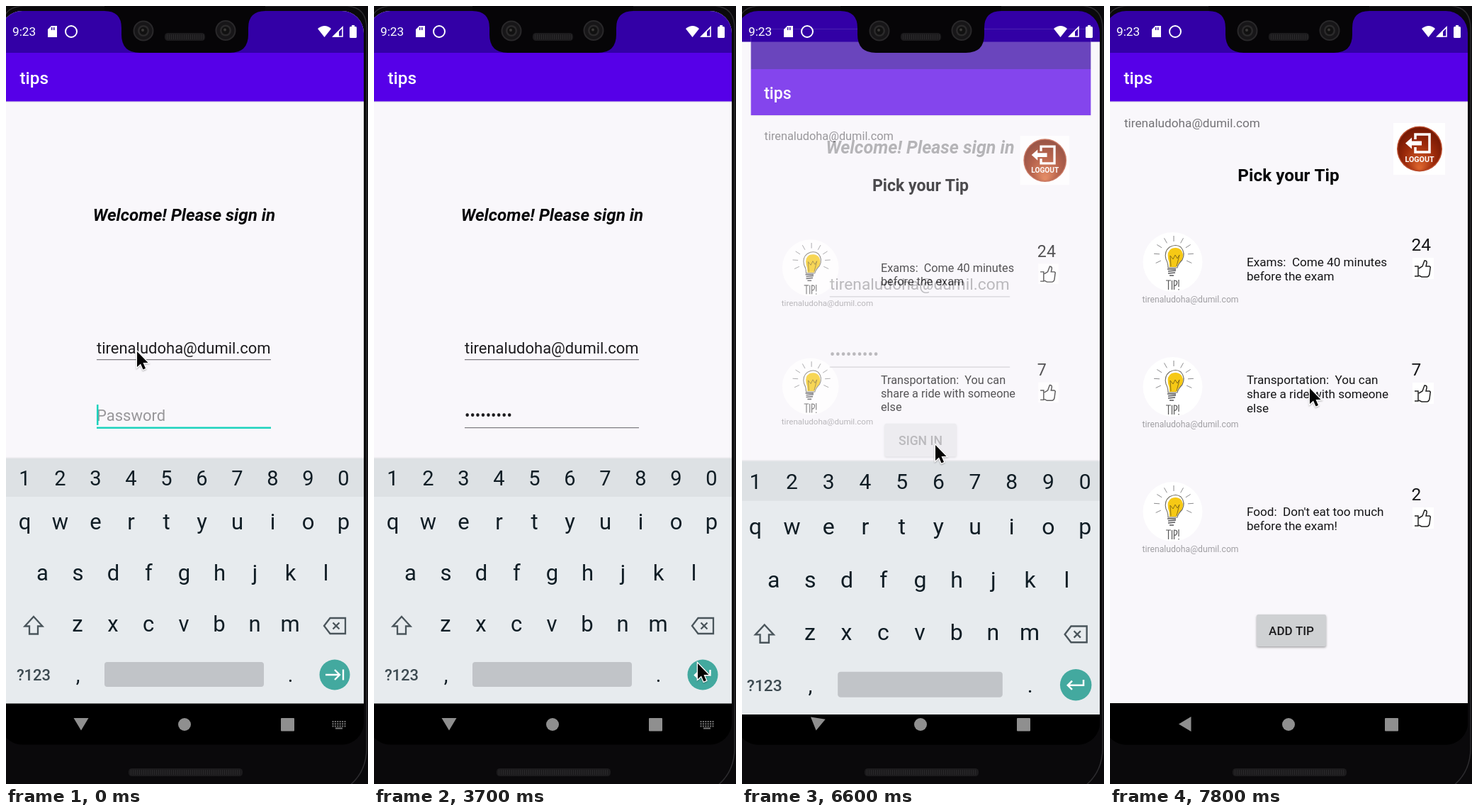
Animation, 511 px wide and 1097 px high, one loop 8000 ms. Source, as an HTML page with a canvas:

```html
<!DOCTYPE html>
<html lang="en">
<head>
<meta charset="utf-8">
<title>Sign in</title>
<style>
html, body { margin: 0; width: 100%; height: 100%; overflow: hidden; background: #0a090b; }
canvas { display: block; }
</style>
</head>
<body>
<canvas id="stage" width="511" height="1097"></canvas>
<script>
const LOOP = 8000, STEP = 100, W = 511, H = 1097;
const FONT = 'Roboto, "Open Sans", sans-serif';
const EMAIL = 'tirenaludoha@dumil.com';
const BAR = '#3300a6', PURPLE = '#5600e8', PAPER = '#f9f7fb', TEAL = '#1cd3bd';
const PIVOT = { x: 252, y: 524 };
const FOCUS_LOST = 3700, OPENING = 6500;

const stage = document.getElementById('stage').getContext('2d');
const scratch = Object.assign(document.createElement('canvas'), { width: W, height: H });
let g = stage;

// Interpolates rows of [time, ...values]; smooth rows ease in and out.
function track(t, rows, smooth) {
  if (t <= rows[0][0]) return rows[0].slice(1);
  for (let i = 1; i < rows.length; i++) {
    const a = rows[i - 1], b = rows[i];
    if (t > b[0]) continue;
    let p = (t - a[0]) / (b[0] - a[0]);
    if (smooth) p = p * p * (3 - 2 * p);
    return a.slice(1).map((v, k) => v + (b[k + 1] - v) * p);
  }
  return rows[rows.length - 1].slice(1);
}

function rect(x, y, w, h, color, r = 0) {
  g.fillStyle = color;
  g.beginPath();
  g.roundRect(x, y, w, h, r);
  g.fill();
}

function disc(x, y, r, color) {
  g.fillStyle = color;
  g.beginPath();
  g.arc(x, y, r, 0, Math.PI * 2);
  g.fill();
}

function text(str, x, y, size, color, align = 'left', style = '') {
  g.font = `${style} ${size}px ${FONT}`;
  g.fillStyle = color;
  g.textAlign = align;
  g.fillText(str, x, y);
}

function line(d, color, width) {
  g.strokeStyle = color;
  g.lineWidth = width;
  g.stroke(new Path2D(d));
}

function shape(d, color) {
  g.fillStyle = color;
  g.fill(new Path2D(d));
}

// Draws a window as one flat layer, scaled about the screen centre.
function layer(alpha, scale, dy, draw) {
  if (alpha <= 0) return;
  g = scratch.getContext('2d');
  g.clearRect(0, 0, W, H);
  g.save();
  g.translate(PIVOT.x, PIVOT.y + dy);
  g.scale(scale, scale);
  g.translate(-PIVOT.x, -PIVOT.y);
  draw();
  g.restore();
  g = stage;
  g.save();
  g.globalAlpha = alpha;
  g.drawImage(scratch, 0, 0);
  g.restore();
}

function toolbar() {
  rect(0, 134, 505, 2, '#e6e3ea');
  rect(0, 66, 505, 68.5, PURPLE);
  text('tips', 19.5, 110, 24.3, '#fff', 'left', '500');
}

function button(label, x, y, color) {
  g.save();
  g.shadowColor = 'rgba(0,0,0,.35)';
  g.shadowBlur = 3;
  g.shadowOffsetY = 1.5;
  rect(x, y, 98, 45, color, 2.5);
  g.restore();
  text(label, x + 49, y + 29, 17, '#1b1b1d', 'center', '500');
}

function passwordField(t) {
  const typed = Math.min(9, Math.max(0, Math.floor((t - 200) / 300) + 1));
  const focused = t < FOCUS_LOST;
  const value = !typed ? '' : focused ? '•'.repeat(typed - 1) + typed : '•'.repeat(typed);
  if (typed) text(value, 128, 585, 22, '#1d1c1f');
  else text('Password', 128, 585, 22, '#98979a');
  if (!focused) return rect(128, 594, 246, 1.2, '#7f7e82');
  rect(128, 593.5, 246, 2.5, TEAL);
  const lastKey = typed ? 200 + (typed - 1) * 300 : 0;
  const end = typed ? g.measureText(value).width : 0;
  if ((t - lastKey) % 1000 < 500) rect(128 + end, 562, 2.5, 29, TEAL);
}

function signIn(t) {
  const [pan] = track(t, [[3700, 0], [3800, 20], [3900, 58], [4000, 78], [4100, 84], [4200, 85]]);
  const dark = (t >= FOCUS_LOST && t < 4300) || (t >= 6100 && t < 6300);
  rect(0, 7, 505, 976, PAPER);
  g.save();
  g.translate(0, -pan);
  toolbar();
  text('Welcome! Please sign in', 251.5, 303, 24.2, '#08080a', 'center', 'italic bold');
  text(EMAIL, 128, 489.5, 22, '#1d1c1f');
  rect(128, 498, 246, 1.2, '#7f7e82');
  passwordField(t);
  button('SIGN IN', 203, 671.5, dark ? '#bfbdc0' : '#cfd1d2');
  g.restore();
  rect(0, 0, 505, 66, BAR);
}

function logout() {
  rect(400, 165, 73, 73, '#fff');
  const glow = g.createRadialGradient(437, 228, 2, 437, 206, 34);
  glow.addColorStop(0, '#d9622c');
  glow.addColorStop(.6, '#9c2a0a');
  glow.addColorStop(1, '#741803');
  disc(437, 201.5, 32, '#b8492a');
  disc(437, 201.5, 30.5, glow);
  line('M431 188v-7h20v25h-20v-7', '#fff', 3.5);
  shape('M417 193.5l9-8v5h14v6h-14v5z', '#fff');
  text('LOGOUT', 437, 220, 10.7, '#fff', 'center', 'bold');
}

function bulb() {
  disc(88.5, 361, 42, '#fff');
  for (let i = 0; i < 9; i++) {
    const a = Math.PI * (.86 + i * .16), c = Math.cos(a), s = Math.sin(a);
    line(`M${90 + c * 20} ${351 + s * 19}L${90 + c * 28} ${351 + s * 27}`, '#8c8c8e', 1);
  }
  shape('M84 368q0-7-2-12q-2-10 5-14q9-3 14 3q4 7 0 14q-6 5-7 9z', '#f6c915');
  line('M82 369q0-7-3-12q-3-11 5-17q9-5 16 0q7 8 2 18q-6 6-7 11z', '#6d6a60', 1.1);
  line('M86 367l-1-15l4 5l3-6l3 5l3-5l-4 16', '#8a6f14', 1);
  line('M81 371h12M82 374l11-1M82 377l10-1M84 380h6', '#57575a', 1.7);
  line('M79 387h7M82.5 387v13M87.5 387v13M90.5 400v-13q5 0 4 4t-4 3M97 386v10M97 399v1.5', '#555', 1.2);
}

function card(index, count, lines) {
  g.save();
  g.translate(0, index * 176);
  bulb();
  text(EMAIL, 45.5, 417.5, 12.2, '#a09fa3');
  const top = 387 - lines.length * 10;
  lines.forEach((s, i) => text(s, 193, top + i * 20, 17.1, '#151517'));
  text(count, 425.5, 345, 24.5, '#151517');
  rect(427, 355, 30, 30, '#fff');
  line('M430 367h5v14h-5M436 370l5-3 3-8q4 0 3 4l-1 4h5q2 1 1 3l-1 8q-1 4-4 4h-7l-4-2', '#222', 1.5);
  g.restore();
}

function tipList() {
  rect(0, 7, 505, 976, PAPER);
  rect(0, 7, 505, 59, BAR);
  toolbar();
  text(EMAIL, 20, 171, 17.2, '#747377');
  text('Pick your Tip', 252, 247, 24.3, '#08080a', 'center', 'bold');
  logout();
  card(0, '24', ['Exams:  Come 40 minutes', 'before the exam']);
  card(1, '7', ['Transportation:  You can', 'share a ride with someone', 'else']);
  card(2, '2', ["Food:  Don't eat too much", 'before the exam!']);
  button('ADD TIP', 207, 858, '#cfd1d3');
}

function keyRow(keys, x, y, size) {
  [...keys].forEach((k, i) => text(k, x + i * 50, y, size, '#101d25', 'center'));
}

function keyboard(t) {
  const ink = '#4a555b';
  rect(0, 636.5, 505, 2, '#e9e8ec');
  rect(0, 638, 505, 345.5, '#e7ebee');
  rect(0, 638, 505, 54, '#dde1e4');
  keyRow('1234567890', 26.5, 676, 29);
  keyRow('qwertyuiop', 26.5, 738, 31);
  keyRow('asdfghjkl', 51.5, 810, 31);
  keyRow('zxcvbnm', 101, 882, 31);
  line('M39 861l12.5 13.5h-6.5v11h-12v-11h-6.5z', ink, 2.3);
  line('M449 874l8.5-11h21.5v22h-21.5zM461.5 869.5l9 9M470.5 869.5l-9 9', ink, 2.3);
  text('?123', 39, 951, 22, '#3d4a51', 'center', '500');
  text(',', 101.5, 953, 29, '#101d25', 'center');
  text('.', 401.5, 953, 29, '#101d25', 'center');
  rect(139, 925, 225, 35, '#c1c4c8', 4);
  disc(464, 943, 21.5, '#43a99f');
  line(t < FOCUS_LOST
    ? 'M451 943h19M464 936l7 7l-7 7M476 935.5v15'
    : 'M474.5 936v7.5h-21M459 937.5l-6 6l6 6', '#fff', 2.4);
}

function navigation(t) {
  const gray = '#8f8f8f';
  const [turn] = track(t, [[6500, 0], [6600, 9], [6700, 84], [6800, 90]]);
  g.save();
  g.translate(106, 1012.5);
  g.rotate(turn * Math.PI / 180);
  shape('M-10.5 -8.5h21l-10.5 17.5z', gray);
  g.restore();
  disc(252, 1013, 9, gray);
  rect(388, 1004, 19, 18.5, gray, 1);
  if (t >= OPENING) return;
  for (let y = 0; y < 3; y++)
    for (let x = 0; x < 6; x++) rect(460.5 + x * 3.4, 1008 + y * 3.3, 2, 2, '#777');
  rect(465, 1017.5, 10, 2, '#777');
}

function statusIcons() {
  text('9:23', 9, 42, 17.2, '#fff');
  shape('M64 28h8v16h-13v-11zM64 30v4h1.5v-4zM67 30v4h1.5v-4z', '#fff');
  line('M100 36a8 8 0 1 1 -16 0a8 8 0 1 1 16 0', '#fff', 2);
  shape('M440 32q10-8 19 0l-9.5 12z', '#fff');
  line('M475 30v13h-13z', '#fff', 1.6);
  shape('M470 35v8.5h-9z', '#fff');
  rect(485, 29, 10, 16, '#fff', 1.5);
  rect(488, 27, 4, 3, '#fff');
}

function lens(x, y) {
  disc(x, y, 14.5, '#29282a');
  disc(x, y, 12.5, '#171618');
  disc(x, y, 8, '#2b2a2b');
  disc(x, y, 5.5, '#111');
  disc(x - 1, y - 1, 2, '#3b3a38');
}

function grille(x, y, w, h) {
  rect(x, y, w, h, '#1c1b1d', h / 2.4);
  for (let i = 3; i < w - 2; i += 3) rect(x + i, y + 2, 1, h - 4, '#29282a');
}

function notch() {
  shape('M139 7Q163 7 163 31V40Q163 66 189 66H316Q342 66 342 40V31Q342 7 366 7V0H139z', '#060507');
  lens(194, 35);
  lens(310, 34.5);
  grille(224, 38, 57, 11);
}

function pointer(t) {
  const [x, y] = track(t, [
    [2700, 185, 487], [3600, 457, 927], [4500, 457, 927], [5400, 273, 619],
    [6800, 273, 619], [7400, 281, 542], [7600, 282, 539]], true);
  const arrow = 'M0 0V22L5 17.5L8.5 25.5L12 24L8.5 16H15.5z';
  g.save();
  g.translate(x, y);
  g.shadowColor = 'rgba(0,0,0,.3)';
  g.shadowBlur = 2;
  g.shadowOffsetY = 1;
  line(arrow, '#fff', 2.6);
  g.shadowColor = 'transparent';
  shape(arrow, '#050505');
  g.restore();
}

function windows(t) {
  if (t < OPENING) {
    signIn(t);
    navigation(t);
    keyboard(t);
    return;
  }
  const [oldScale, newScale, newAlpha, keysAlpha, keysDrop] = track(t, [
    [6500, 1.008, .9, .1, 1, 0], [6600, 1.034, .95, .72, 1, 0],
    [6700, 1.049, .99, 1, .33, 42], [6800, 1.05, 1, 1, 0, 90]]);
  if (t < 6800) {
    layer(1, oldScale, 0, () => signIn(t));
    if (t >= 6700) rect(0, 916, 505, 67, '#000');
  }
  layer(newAlpha, newScale, 0, tipList);
  rect(0, 983, 505, 60, '#000');
  navigation(t);
  layer(keysAlpha, oldScale, keysDrop, () => keyboard(t));
}

function draw(t) {
  rect(0, 0, W, H, '#0a090b');
  line('M-2 14Q4 1 24 0H482Q509 2 509 32V1046Q509 1080 484 1100', '#2d2c2f', 1.5);
  g.save();
  g.beginPath();
  g.roundRect(-8, 7, 513, 1034.5, 31);
  g.clip();
  rect(0, 0, W, H, '#000');
  windows(t);
  g.restore();
  notch();
  statusIcons();
  grille(173, 1075, 161, 11);
  pointer(t);
}

const start = performance.now();
function tick() {
  const t = (performance.now() - start) % LOOP;
  draw(Math.floor(t / STEP) * STEP);
  requestAnimationFrame(tick);
}
tick();
</script>
</body>
</html>
```
